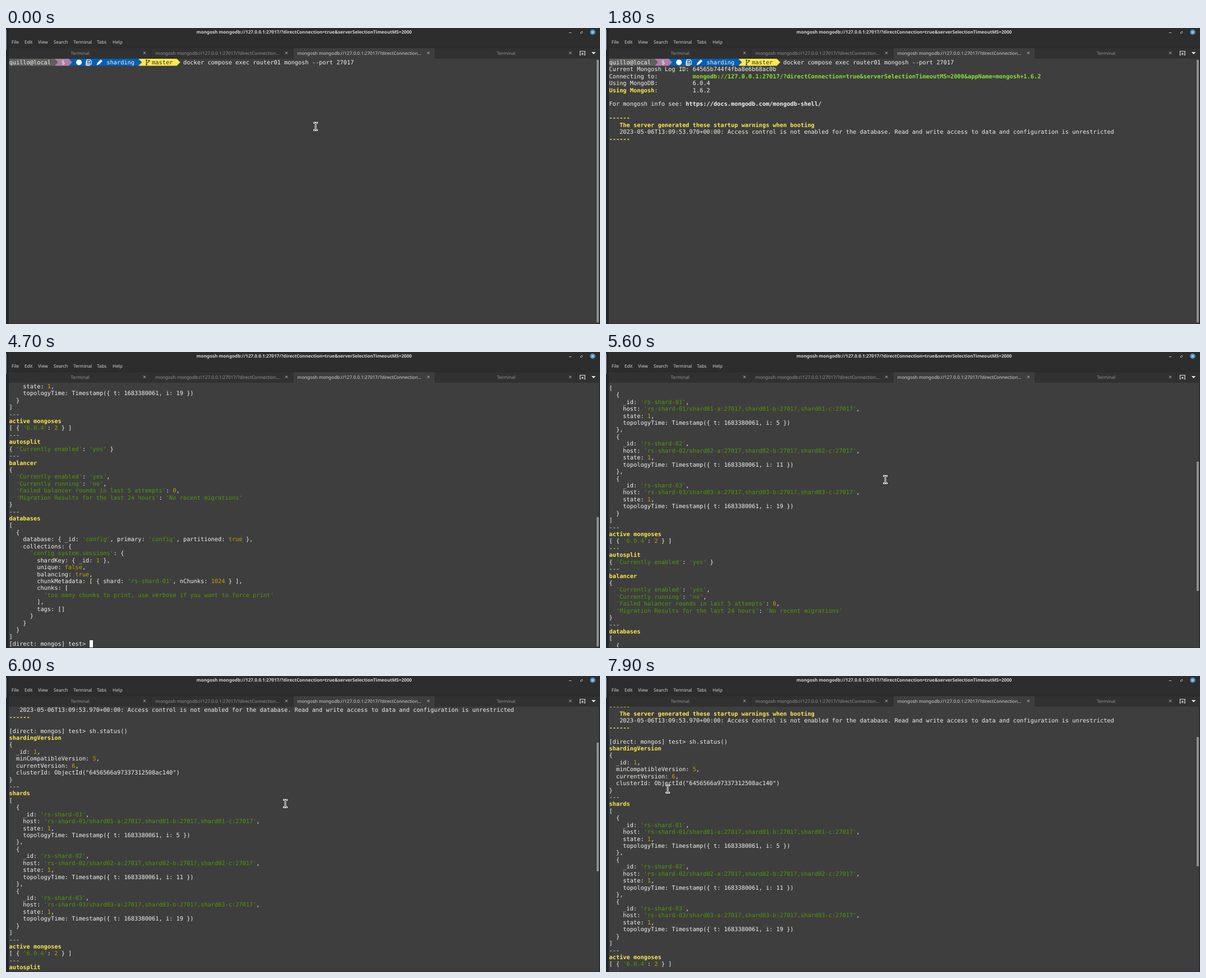
An HTML page that plays this animation: 1059x529 px, repeating every 8000 ms.

```html
<!DOCTYPE html>
<html lang="en">
<head>
<meta charset="utf-8">
<title>Terminal</title>
<style>
  html, body { margin: 0; width: 100%; height: 100%; overflow: hidden; background: #20262c; }
  #stage { position: relative; width: 1059px; height: 529px; overflow: hidden; text-rendering: geometricPrecision; }
  #stage > *, #content > *, #rows div { position: absolute; }
  #chrome { left: 0; top: 0; font: 8.1px "Noto Sans", sans-serif; fill: #d4d4d4; }
  #chrome .mid { text-anchor: middle; }
  #chrome .dim { fill: #949494; }
  #pane { left: 5px; top: 55px; width: 1052px; height: 473px; overflow: hidden; background: #3e3e3e; }
  #content { position: absolute; left: .5px; top: .4px; }
  #rows { top: .5px; color: #f2f2f0; white-space: pre;
    font: 10.328px/12.434px "DejaVu Sans Mono", monospace; font-variant-ligatures: none; }
  #prompt { left: 0; top: 0; overflow: visible; }
  #caret { width: 6.2px; height: 12.4px; background: #fff; }
  #thumb { left: 1052.5px; width: 4px; background: #8f8f8f; }
  #mouse { left: -6px; top: -10px; }
  .y { color: #fce94f; }
  .g { color: #8ae234; }
  .s { color: #4e9a06; }
  .n { color: #c4a000; }
  .d { color: #343420; }
</style>
</head>
<body>
<div id="stage">
  <svg id="chrome" width="1059" height="529">
    <path d="M0 3h1v36h-1z" fill="#8a92a4"/>
    <path d="M5 0H1059V529H5z" fill="#2d2d2e"/>
    <path d="M5 35H1059V55H5z" fill="#313132"/>
    <path d="M5 35.5H1059M258.5 36V55M1016.5 36V55" stroke="#29292a"/>
    <path d="M513 36H764V55H513z" fill="#3e3e3e"/>
    <text class="mid" x="531.5" y="10.4" font-weight="700">mongosh mongodb://127.0.0.1:27017/?directConnection=true&amp;serverSelectionTimeoutMS=2000</text>
    <g id="menu"></g>
    <g id="tabs"></g>
    <g fill="none" stroke="#c8c8c8">
      <path d="M1004 8.500h4M1025.500 6.500h2v2M1024.500 7.500v2h2"/>
      <circle cx="1046" cy="7.500" r="4.700" fill="#5294c4" stroke="none"/>
      <path d="M1044.300 5.800l3.400 3.400m0-3.400l-3.400 3.400" stroke="#fff"/>
      <path d="M1025 48.500h-1.500v-7h8.500v7h-1.500M1027.800 48.500v-4.500m-2 2h4" stroke="#e4e4e4" stroke-width="1.200"/>
      <path d="M1043.800 43h7.600l-3.800 4z" fill="#e4e4e4" stroke="none"/>
    </g>
  </svg>
  <div id="pane">
    <div id="content">
      <svg id="prompt" width="320" height="13">
        <g id="segments"></g>
        <circle cx="124" cy="6.400" r="5" fill="#fff"/>
        <g fill="none" stroke="#fff" stroke-width="1.200">
          <path d="M138.500 1.500h5l2.500 2.500v6h-7.500zM137 3.500v8.300h7M142 3.500v3.600m-1.800-1.800h3.600M140.200 8.500h3.600"/>
          <path d="M156.500 10.500l1-3 5.500-5.300 2 2-5.500 5.300z" fill="#fff"/>
        </g>
        <g fill="#343420">
          <path d="M244.500 3.500v6M249 4.500c0 3-4.500 1.500-4.500 4" fill="none" stroke="#343420" stroke-width="1.100"/>
          <circle cx="244.500" cy="2.600" r="1.400"/><circle cx="244.500" cy="10.300" r="1.400"/><circle cx="249" cy="3.500" r="1.400"/>
        </g>
      </svg>
      <div id="rows"></div>
      <div id="caret"></div>
    </div>
  </div>
  <div id="thumb"></div>
  <svg id="mouse" width="12" height="20" fill="none" stroke-linecap="square"></svg>
</div>
<script>
const $ = id => document.getElementById(id);
const CELL = 6.218, ROW = 12.434, LOOP = 8000, VIEW_ROWS = 38;
const PROMPT = '[direct: mongos] test> ', COMMAND = 'sh.status()';

const menu = [['File', 10], ['Edit', 33], ['View', 57], ['Search', 85], ['Terminal', 120], ['Tabs', 162], ['Help', 190]];
$('menu').innerHTML = menu.map(([label, x]) => `<text x="${x}" y="28">${label}</text>`).join('');

const longTab = 'mongosh mongodb://127.0.0.1:27017/?directConnection…';
const tabs = [['Terminal', 132, 247], [longTab, 377, 500], [longTab, 630, 753], ['Terminal', 891.5, 1006]];
$('tabs').innerHTML = tabs.map(([label, x, close], i) =>
  `<text class="mid ${i === 2 ? '' : 'dim'}" x="${x}" y="47.7">${label}</text>
   <path d="M${close - 2} 42.5l4 4m0-4l-4 4" stroke="#c4c4c4"/>`).join('');

const beam = 'M3.5 3.5h1.5l1 1 1-1h1.5M6 4.5v11M3.5 16.5h1.5l1-1 1 1h1.5';
$('mouse').innerHTML = [['#fff', 2.8], ['#262626', .9]].map(([color, width]) =>
  `<path d="${beam}" stroke="${color}" stroke-width="${width}"/>`).join('');

// Later segments come first so that each arrow tip overlaps its neighbour.
const segments = [['#fce94f', 37, 48], ['#0660b4', 17, 37], ['#ad7fa8', 13, 17], ['#5f605e', 0, 13]];
$('segments').innerHTML = segments.map(([fill, from, to]) =>
  `<path fill="${fill}" d="M${from * CELL} 0H${to * CELL}l${CELL} ${ROW / 2}L${to * CELL} ${ROW}H${from * CELL}z"/>`).join('');

const span = (cls, text) => `<span class="${cls}">${text}</span>`;
const bold = (cls, text) => `<b class="${cls}">${text}</b>`;

function highlight(line) {
  if (/^[a-z][a-zA-Z ]*$/.test(line)) return bold('y', line);
  if (/Timestamp|ObjectId/.test(line)) return line;
  return line.replace(/'[^']*'|\b(\d+|true|false)\b/g, m => span(m[0] === "'" ? 's' : 'n', m));
}

const intro = [
  'quillo@local   $' + ' '.repeat(12) + 'sharding     ' + span('d', 'master') + '   docker compose exec router01 mongosh --port 27017',
  'Current Mongosh Log ID: 64565b744f4fba8e6b68ac0b',
  'Connecting to:          ' + bold('g', 'mongodb://127.0.0.1:27017/?directConnection=true&amp;serverSelectionTimeoutMS=2000&amp;appName=mongosh+1.6.2'),
  'Using MongoDB:          6.0.4',
  bold('y', 'Using Mongosh') + ':          1.6.2',
  '',
  'For mongosh info see: ' + bold('', 'https://docs.mongodb.com/mongodb-shell/'),
  '',
  bold('y', '------'),
  bold('y', '   The server generated these startup warnings when booting'),
  '   2023-05-06T13:09:53.970+00:00: Access control is not enabled for the database. Read and write access to data and configuration is unrestricted',
  bold('y', '------'),
  '',
  PROMPT + '<span id="typed"></span>'
];

const shard = (n, time, end) => `  {
    _id: 'rs-shard-0${n}',
    host: 'rs-shard-0${n}/${['a', 'b', 'c'].map(c => `shard0${n}-${c}:27017`).join(',')}',
    state: 1,
    topologyTime: Timestamp({ t: 1683380061, i: ${time} })
  }${end}`;

const status = `shardingVersion
{
  _id: 1,
  minCompatibleVersion: 5,
  currentVersion: 6,
  clusterId: ObjectId("6456566a97337312508ac140")
}
---
shards
[
${shard(1, 5, ',')}
${shard(2, 11, ',')}
${shard(3, 19, '')}
]
---
active mongoses
[ { '6.0.4': 2 } ]
---
autosplit
{ 'Currently enabled': 'yes' }
---
balancer
{
  'Currently enabled': 'yes',
  'Currently running': 'no',
  'Failed balancer rounds in last 5 attempts': 0,
  'Migration Results for the last 24 hours': 'No recent migrations'
}
---
databases
[
  {
    database: { _id: 'config', primary: 'config', partitioned: true },
    collections: {
      'config.system.sessions': {
        shardKey: { _id: 1 },
        unique: false,
        balancing: true,
        chunkMetadata: [ { shard: 'rs-shard-01', nChunks: 1024 } ],
        chunks: [
          'too many chunks to print, use verbose if you want to force print'
        ],
        tags: []
      }
    }
  }
]`.split('\n').map(highlight);

const lines = [...intro, ...status, PROMPT];
$('rows').innerHTML = lines.map((line, i) => `<div style="top:${i * ROW}px">${line}</div>`).join('');
const rows = [...$('rows').children];

// Timelines: [start in ms, value...]
const shownRows = [[0, 1], [1600, 3], [1700, 7], [1800, 12], [1900, 14], [4700, lines.length]];
const typedChars = [[0, 0], [2600, 2], [2800, 3], [3100, 4], [3300, 5], [3400, 6], [3500, 8], [3600, 9], [4000, 11]];
const caretAt = [[0], [500, 0, 99], [1100, 1, 0], [1600], [2200, 13, PROMPT.length], [4500, 14, 0], [4700, lines.length - 1, PROMPT.length]];
const scrollAt = [[4900, 39], [5300, 30.6], [5800, 17.5], [5900, 13.5], [6000, 10.08], [6100, 9.1], [6500, 9.1], [6600, 8.53]];
const mouseAt = [[0, 552, 176], [1000], [5000, 498, 228], [6900, 372, 204], [7000, 231, 187], [7200, 190, 222],
  [7300, 146, 262], [7400, 122, 271], [7500, 107, 248], [7600, 109, 212], [7700, 118, 184], [7800, 113, 192], [7900, 110, 202]];

const current = (track, t) => track.filter(key => key[0] <= t).pop();

function interpolate(track, t) {
  const next = track.findIndex(key => key[0] > t);
  if (next < 0) return track[track.length - 1][1];
  if (next === 0) return track[0][1];
  const [t0, a] = track[next - 1], [t1, b] = track[next];
  return a + (b - a) * (t - t0) / (t1 - t0);
}

function render(t) {
  const count = current(shownRows, t)[1];
  rows.forEach((row, i) => row.style.visibility = i < count ? 'visible' : 'hidden');

  const typed = current(typedChars, t)[1];
  $('typed').textContent = COMMAND.slice(0, typed);

  const [, row, col] = current(caretAt, t);
  $('caret').hidden = row === undefined;
  if (row !== undefined) {
    $('caret').style.left = (col + (row === 13 ? typed : 0)) * CELL + 'px';
    $('caret').style.top = row * ROW + 'px';
  }

  const total = Math.max(VIEW_ROWS, count);
  const scroll = count > VIEW_ROWS ? interpolate(scrollAt, t) : 0;
  $('content').style.transform = `translateY(${-scroll * ROW}px)`;
  $('thumb').style.top = 57 + scroll / total * 470 + 'px';
  $('thumb').style.height = VIEW_ROWS / total * 470 - 1 + 'px';

  const [, x, y] = current(mouseAt, t);
  $('mouse').style.visibility = x === undefined ? 'hidden' : 'visible';
  if (x !== undefined) $('mouse').style.transform = `translate(${x}px, ${y}px)`;
}

const start = performance.now();
function tick() {
  const t = (performance.now() - start) % LOOP;
  render(Math.floor(t / 100) * 100);
  requestAnimationFrame(tick);
}
tick();
</script>
</body>
</html>
```
